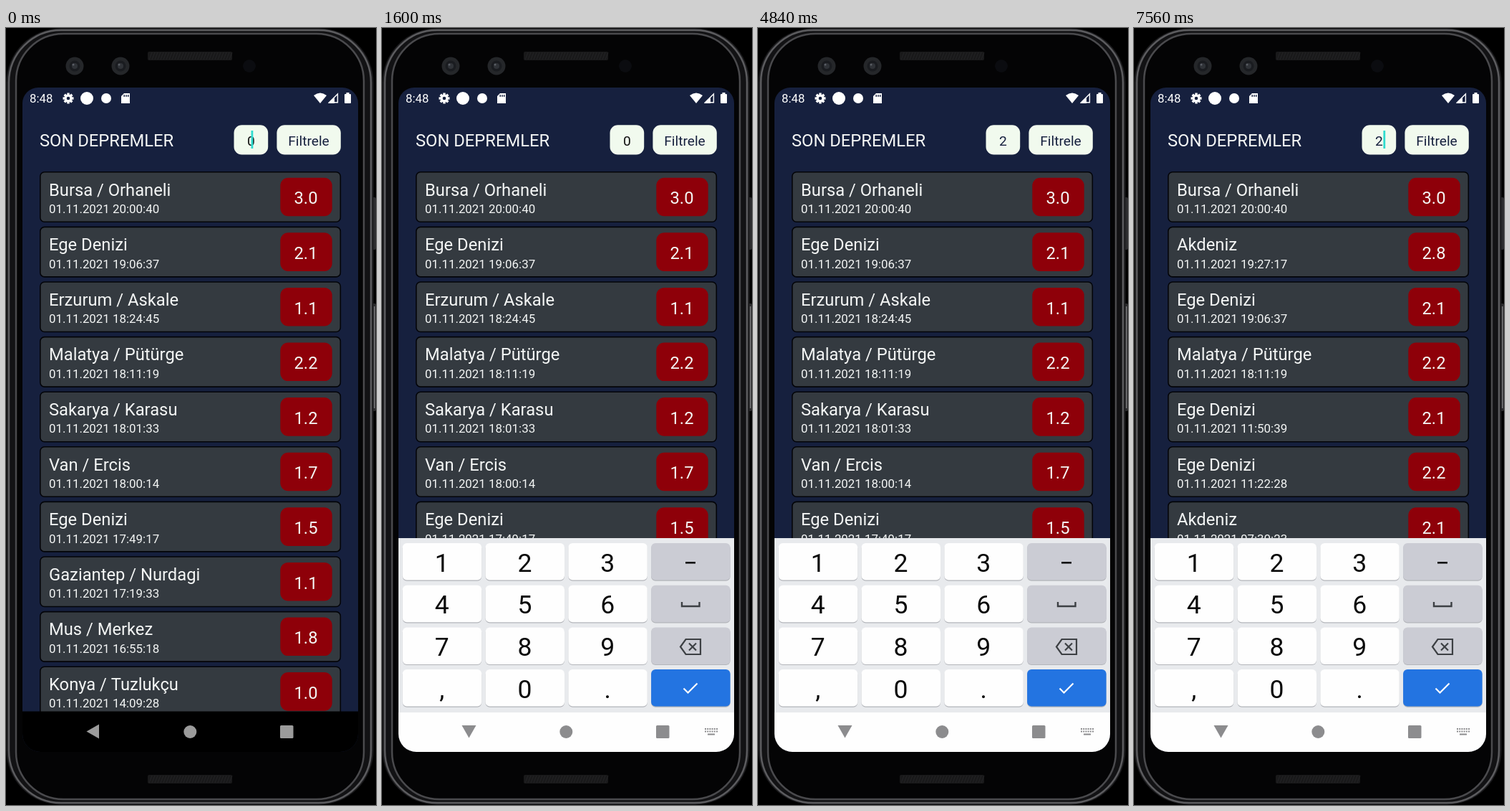
An HTML page with a canvas that plays this animation: 517 px wide and 1083 px high, repeating every 7600 ms.

```html
<!DOCTYPE html>
<html lang="tr">
<head>
<meta charset="utf-8">
<title>Son Depremler</title>
<style>
  html, body { margin: 0; width: 100%; height: 100%; overflow: hidden; background: #000; }
  canvas { display: block; width: 517px; height: 1083px; }
</style>
</head>
<body>
<canvas id="stage" width="517" height="1083"></canvas>
<script>
const ctx = document.getElementById('stage').getContext('2d');
const LOOP = 7600;
const KEYBOARD_AT = 260, TYPED_AT = 2280, PRESS_AT = 3870, RELEASE_AT = 4080, FILTERED_AT = 6200;
const NAVY = '#16203e', CREAM = '#f1faee', LIGHT = '#f4f6f5';

const allQuakes = [
  ['Bursa / Orhaneli', '20:00:40', '3.0'],
  ['Ege Denizi', '19:06:37', '2.1'],
  ['Erzurum / Askale', '18:24:45', '1.1'],
  ['Malatya / Pütürge', '18:11:19', '2.2'],
  ['Sakarya / Karasu', '18:01:33', '1.2'],
  ['Van / Ercis', '18:00:14', '1.7'],
  ['Ege Denizi', '17:49:17', '1.5'],
  ['Gaziantep / Nurdagi', '17:19:33', '1.1'],
  ['Mus / Merkez', '16:55:18', '1.8'],
  ['Konya / Tuzlukçu', '14:09:28', '1.0']
];
const strongQuakes = [
  ['Bursa / Orhaneli', '20:00:40', '3.0'],
  ['Akdeniz', '19:27:17', '2.8'],
  ['Ege Denizi', '19:06:37', '2.1'],
  ['Malatya / Pütürge', '18:11:19', '2.2'],
  ['Ege Denizi', '11:50:39', '2.1'],
  ['Ege Denizi', '11:22:28', '2.2'],
  ['Akdeniz', '07:30:23', '2.1']
];

const clamp = v => Math.max(0, Math.min(1, v));
const easeInOut = u => u < 0.5 ? 2 * u * u : 1 - 2 * (1 - u) * (1 - u);

function rect(x, y, w, h, color) {
  ctx.fillStyle = color;
  ctx.fillRect(x, y, w, h);
}

function box(x, y, w, h, r, fill, stroke, lineWidth = 1) {
  ctx.beginPath();
  ctx.roundRect(x, y, w, h, r);
  if (fill) { ctx.fillStyle = fill; ctx.fill(); }
  if (stroke) { ctx.strokeStyle = stroke; ctx.lineWidth = lineWidth; ctx.stroke(); }
}

function disc(x, y, r, color) {
  ctx.beginPath();
  ctx.arc(x, y, r, 0, Math.PI * 2);
  ctx.fillStyle = color;
  ctx.fill();
}

function trace(points, closed) {
  ctx.beginPath();
  points.forEach(([x, y]) => ctx.lineTo(x, y));
  if (closed) ctx.closePath();
}

function poly(points, color) {
  trace(points, true);
  ctx.fillStyle = color;
  ctx.fill();
}

function line(points, color, width, closed) {
  trace(points, closed);
  ctx.strokeStyle = color;
  ctx.lineWidth = width;
  ctx.stroke();
}

function text(str, x, y, size, color, align = 'left') {
  ctx.font = `${size}px Roboto, sans-serif`;
  ctx.textAlign = align;
  ctx.fillStyle = color;
  ctx.fillText(str, x, y);
}

function speaker(y) {
  box(198, y, 118, 12, 2, '#19191a');
  for (let x = 200; x < 315; x += 4) {
    line([[x, y + 11], [x + 4, y + 1]], '#242426', 1);
  }
}

function drawPhone() {
  rect(0, 0, 517, 1083, '#000');
  box(511, 236, 6, 73, 2, '#2c2c2e');
  box(511, 384, 6, 150, 2, '#2c2c2e');
  rect(514, 388, 1.5, 142, '#7a7a7c');
  box(0.5, 0.5, 513, 1082, 76, '#1c1c1e');
  box(4, 3, 506, 1077, 73, '#121214', '#5c5c5f', 2.5);
  box(14, 8, 486, 1067, 66, '#040405', '#4a4a4d', 2.5);
  speaker(33);
  speaker(1041);
  for (const x of [96, 160]) {
    disc(x, 53, 12.5, '#25272a');
    disc(x, 53, 7.5, '#1a1c20');
    disc(x, 53, 4, '#303338');
    disc(x - 2, 51, 1.5, '#5a5e65');
  }
  disc(340, 53, 9, '#0b0c10');
}

function drawStatusBar() {
  text('8:48', 33, 104, 16.8, '#fff');
  for (let i = 0; i < 8; i++) {
    ctx.save();
    ctx.translate(87, 98);
    ctx.rotate(i * Math.PI / 4);
    rect(-1.7, -7.5, 3.4, 4, '#fff');
    ctx.restore();
  }
  disc(87, 98, 5.5, '#fff');
  disc(87, 98, 2.3, NAVY);
  disc(113, 98, 9, '#fff');
  disc(140, 98, 7, '#fff');
  poly([[165, 91], [173, 91], [173, 105], [161, 105], [161, 95]], '#fff');
  for (const x of [164.5, 167.3, 170]) rect(x, 93, 1.4, 3, NAVY);

  ctx.beginPath();
  ctx.moveTo(439, 105);
  ctx.lineTo(430, 94);
  ctx.quadraticCurveTo(439, 87, 448, 94);
  ctx.fillStyle = '#fff';
  ctx.fill();
  line([[451.5, 103.8], [463.4, 103.8], [463.4, 92]], '#fff', 1.4, true);
  poly([[450, 105], [459, 105], [459, 96]], '#fff');
  box(473, 92, 9, 13, 1, '#fff');
  rect(475.5, 90, 4, 3, '#fff');
}

function drawQuake([place, clock, size], i) {
  const y = 200 + i * 76.6;
  box(47.8, y + 0.8, 419.5, 69.5, 6, '#343a40', '#030408', 1.6);
  text(place, 60, y + 33.5, 23.75, LIGHT);
  text('01.11.2021 ' + clock, 60, y + 58, 16.9, LIGHT);
  box(383.3, y + 8.7, 72.4, 53.6, 11, '#8e0009');
  text(size, 419, y + 45.3, 23.75, LIGHT, 'center');
}

function cursorVisible(t) {
  if (t < TYPED_AT) return t % 1000 < 500;
  return (t - TYPED_AT) % 1000 < 500;
}

function buttonOpacity(t) {
  const down = easeInOut(clamp((t - PRESS_AT) / 150));
  const up = easeInOut(clamp((t - RELEASE_AT) / 250));
  return 1 - 0.8 * down * (1 - up);
}

function drawHeader(t) {
  const typed = t >= TYPED_AT;
  text('SON DEPREMLER', 47, 165.3, 23.75, LIGHT);
  box(318.5, 135.3, 47.7, 41.2, 11, CREAM);
  text(typed ? '2' : '0', 342.5, 163.5, 19.2, typed ? NAVY : '#111', 'center');
  if (cursorVisible(t)) rect(typed ? 348.4 : 342.5, 143, 2.8, 25, '#2fdccf');
  ctx.globalAlpha = buttonOpacity(t);
  box(378.4, 135.3, 89.4, 41.2, 11, CREAM);
  text('Filtrele', 423, 163.5, 19.2, NAVY, 'center');
  ctx.globalAlpha = 1;
}

const labels = ['123', '456', '789', ',0.'];

function drawKey(col, row) {
  const x = 28.7 + col * 115.8, y = 718 + row * 58.7;
  const face = col < 3 ? '#fefefe' : row < 3 ? '#cbccd4' : '#2374e1';
  box(x, y + 1.2, 110.5, 51.5, 6, '#b3b5ba');
  box(x, y, 110.5, 51.5, 6, face);
  if (col < 3) text(labels[row][col], x + 55, y + 39.5, 35.5, '#080808', 'center');
}

function drawKeyboard() {
  rect(23, 711, 470, 243, '#e8eaed');
  for (let row = 0; row < 4; row++) {
    for (let col = 0; col < 4; col++) drawKey(col, row);
  }
  const ink = '#3d4044';
  rect(424, 744, 14, 2.6, '#111');
  line([[419, 800], [419, 806], [443.5, 806], [443.5, 800]], ink, 2.4);
  line([[417, 862.5], [424.5, 852], [445, 852], [445, 873], [424.5, 873]], ink, 2.2, true);
  line([[429, 857.5], [439, 867.5]], ink, 2.2);
  line([[439, 857.5], [429, 867.5]], ink, 2.2);
  line([[421.5, 920.5], [427.5, 926.5], [440.5, 913.5]], '#fff', 2.2);
}

function drawNavBar(alpha, turn) {
  const gray = alpha > 0.5 ? '#8c8c8e' : '#9b9b9b';
  ctx.globalAlpha = alpha;
  for (let row = 0; row < 2; row++) {
    for (let col = 0; col < 6; col++) rect(451 + col * 3.2, 976 + row * 3.5, 2, 2, gray);
  }
  rect(455, 983.5, 10, 2, gray);
  ctx.globalAlpha = 1;
  ctx.save();
  ctx.translate(121.5, 980.5);
  ctx.rotate(-turn * Math.PI / 2);
  poly([[-9, 0], [8.5, -10], [8.5, 10]], gray);
  ctx.restore();
  disc(257.3, 981, 9, gray);
  box(383, 972, 18.5, 18, 1.5, gray);
}

function draw(t) {
  drawPhone();
  ctx.save();
  ctx.beginPath();
  ctx.roundRect(23, 83, 469, 926, [22, 22, 25, 25]);
  ctx.clip();
  rect(23, 83, 470, 927, NAVY);
  drawStatusBar();
  drawHeader(t);
  (t < FILTERED_AT ? allQuakes : strongQuakes).forEach(drawQuake);
  rect(23, 952.5, 470, 57, '#000');

  const shown = clamp((t - KEYBOARD_AT) / 220);
  const alpha = 1 - (1 - clamp((t - KEYBOARD_AT) / 100)) ** 3;
  if (shown > 0) {
    ctx.globalAlpha = alpha;
    rect(23, 952, 470, 58, '#fefefe');
    ctx.save();
    ctx.translate(0, 30 * (1 - shown) ** 5);
    drawKeyboard();
    ctx.restore();
    ctx.globalAlpha = 1;
  }
  drawNavBar(alpha, easeInOut(clamp((t - KEYBOARD_AT) / 270)));
  ctx.restore();
}

const start = performance.now();
function tick() {
  draw((performance.now() - start) % LOOP);
  requestAnimationFrame(tick);
}
tick();
</script>
</body>
</html>
```
